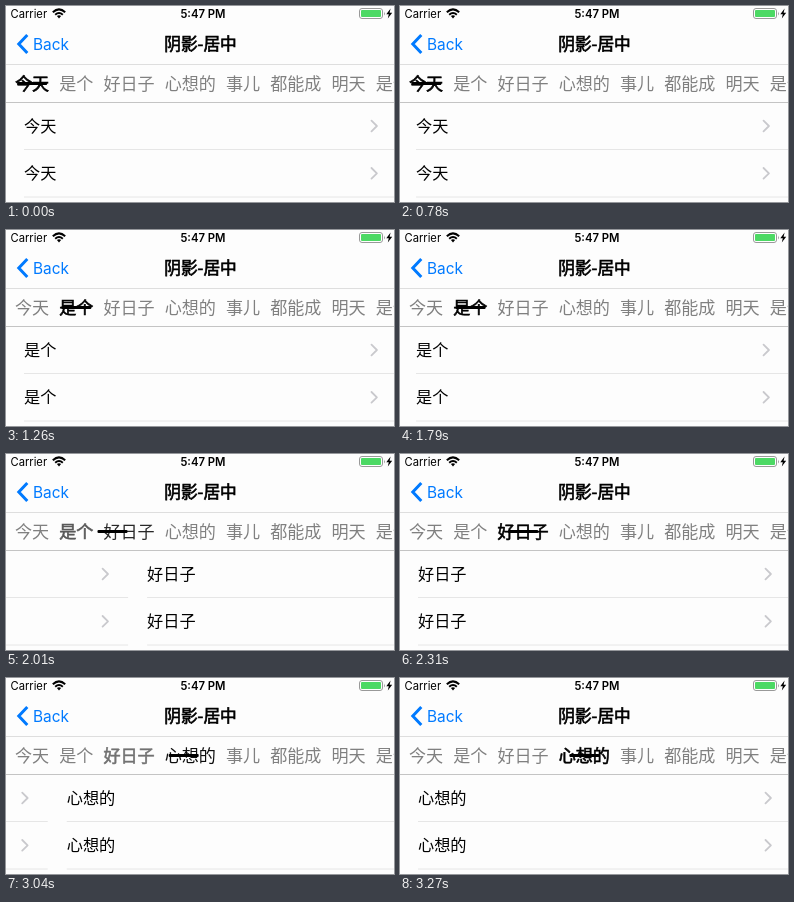
Recreate the animation shown at these times as an HTML page. Size 388 by 196 pixels, loop 4.11 s.

```html
<!DOCTYPE html>
<html lang="zh-CN">
<head>
<meta charset="utf-8">
<style>
html, body { margin: 0; width: 100%; height: 100%; overflow: hidden; background: #fdfdfd; }
svg { display: block; }
text { font-family: "Noto Sans CJK SC", "Noto Sans CJK", sans-serif; white-space: pre; }
.ui { font-family: Inter, sans-serif; }
.line { fill: none; stroke-linecap: round; stroke-linejoin: round; }
</style>
</head>
<body>
<svg id="stage" width="388" height="196" viewBox="0 0 388 196">
  <text class="ui" x="4.5" y="12" font-size="11.2">Carrier</text>
  <g class="line" stroke="#000" stroke-width="2" style="stroke-linecap:butt">
    <path d="M46.8 6.2Q53 .6 59.2 6.2M49.2 8.7Q53 5.4 56.8 8.7"/>
    <path d="M50.9 10.1Q53 8.5 55.1 10.1L53 12.4Z" fill="#000" stroke="none"/>
  </g>
  <text class="ui" x="197" y="12" font-size="11.3" font-weight="600" text-anchor="middle">5:47 PM</text>
  <rect x="353.5" y="2.5" width="23" height="10" rx="2.5" fill="#fff" stroke="#999"/>
  <rect x="355" y="4" width="20" height="7" rx="1" fill="#4cd964"/>
  <path d="M378 5.5q1.6 2 0 4z" fill="#999"/>
  <path d="M384.6 2.5L380.3 8.2H382.8L381.8 12.5L386.2 6.7H383.6Z"/>
  <path d="M21.3 29L12.8 38L21.3 47" fill="none" stroke="#007aff" stroke-width="3"/>
  <text class="ui" x="27" y="43.7" font-size="15.4" fill="#007aff">Back</text>
  <text x="194.5" y="44" font-size="16.7" text-anchor="middle" stroke="#000" stroke-width=".65">阴影-居中</text>
  <path d="M0 58.5H388" stroke="#dedede"/>
  <g id="tabs"></g>
  <rect id="bar" y="76" width="30" height="3" rx="1"/>
  <g id="pages"></g>
  <path d="M0 96.5H388" stroke="#c4c4c4"/>
</svg>
<script>
const LOOP = 4110, PAGE = 392, GREY = 128, SIZE = 17.1, GAP = 10;
const titles = ['今天', '是个', '好日子', '心想的', '事儿', '都能成', '明天', '是个'];
// start, end and number of steps of each swipe
const swipes = [[780, 1260, 10], [1790, 2310, 10], [2760, 3270, 9]];
const $ = id => document.getElementById(id);

function add(parent, tag, attrs, text = '') {
  const el = document.createElementNS('http://www.w3.org/2000/svg', tag);
  for (const key in attrs) el.setAttribute(key, attrs[key]);
  el.textContent = text;
  return parent.appendChild(el);
}

let x = 9;
const tabs = titles.map(title => {
  const width = title.length * SIZE;
  const el = add($('tabs'), 'text', { x, y: 83.5, 'font-size': SIZE, 'stroke-width': 0.6 }, title);
  const center = x + width / 2;
  x += width + GAP;
  return { el, center };
});

titles.slice(0, 4).forEach((title, i) => {
  const page = add($('pages'), 'g', { transform: `translate(${i * PAGE})` });
  for (const y of [120, 167.3]) {
    add(page, 'text', { x: 18, y: y + 6, 'font-size': 16.2 }, title);
    add(page, 'path', { class: 'line', d: `M365.5 ${y - 5.3}l5.4 5.3l-5.4 5.3`, stroke: '#c9c9cd', 'stroke-width': 1.8 });
  }
  add(page, 'path', { d: 'M18 143.5H391M18 191H391', stroke: '#e6e6e6' });
});

// Page position: a quick drag, then a long slowdown
function position(t) {
  let pos = 0;
  for (const [start, end, steps] of swipes) {
    if (t < start) break;
    const step = Math.floor((t - start) / (end - start) * steps + 0.1);
    const u = Math.min(1, step / steps);
    pos += Math.max(0.005, 1 - (1 - u ** 1.65) ** 4.65);
  }
  return pos;
}

function draw(t) {
  const pos = position(t);
  const from = Math.min(Math.floor(pos), 3), part = pos - from;
  const settled = swipes.filter(s => t >= s[1]).length;
  tabs.forEach(({ el }, i) => {
    const shade = Math.round(GREY * Math.min(1, Math.abs(i - pos)));
    const color = `rgb(${shade},${shade},${shade})`;
    el.setAttribute('fill', color);
    el.setAttribute('stroke', i === settled ? color : 'none');
  });
  const center = tabs[from].center + part * (tabs[from + 1].center - tabs[from].center);
  $('bar').setAttribute('x', center - 15);
  $('pages').setAttribute('transform', `translate(${-pos * PAGE})`);
}

const begin = performance.now();
function tick() {
  draw((performance.now() - begin) % LOOP);
  requestAnimationFrame(tick);
}
tick();
</script>
</body>
</html>
```
